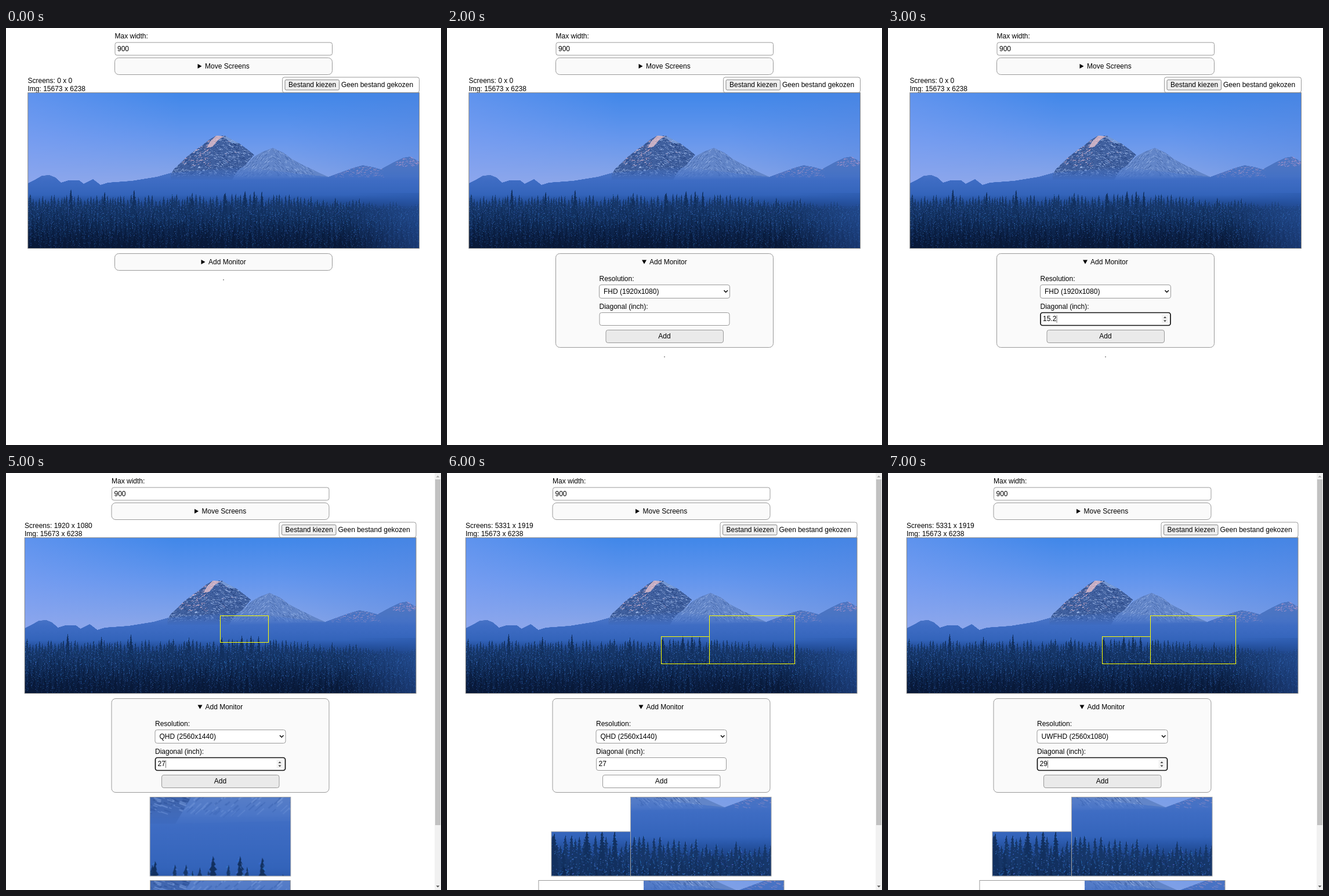
Recreate the animation shown at these times as an HTML page with a canvas. Size 750 by 720 pixels, loop 8000 ms.

```html
<!DOCTYPE html>
<html lang="nl">
<head>
<meta charset="utf-8">
<title>Monitor layout</title>
<style>
html, body { margin: 0; overflow: hidden; background: #fff; }
canvas { display: block; }
</style>
</head>
<body>
<canvas id="stage" width="750" height="720"></canvas>
<script>
const ctx = document.getElementById('stage').getContext('2d');
const IMG_W = 15673, IMG_H = 6238, VIEW = 675 / IMG_W;
const LEFT = 37.5, TOP = 112, MID = 375;
const GREY = '#999';

let seed = 7;
const rnd = (a = 0, b = 1) => a + (b - a) * (seed = seed * 16807 % 2147483647) / 2147483647;

function polygon(points) {
  const path = new Path2D();
  for (let i = 0; i < points.length; i += 2) path.lineTo(points[i], points[i + 1]);
  path.closePath();
  return path;
}

// ---- landscape, drawn once at three times the view size ----
function paintPhoto() {
  const photo = document.createElement('canvas');
  photo.width = 2025;
  photo.height = 806;
  const g = photo.getContext('2d');
  g.scale(3, 3);
  g.translate(-LEFT, -TOP);

  const fade = (x0, y0, x1, y1, ...colors) => {
    const grad = g.createLinearGradient(x0, y0, x1, y1);
    colors.forEach((c, i) => grad.addColorStop(i / (colors.length - 1), c));
    return grad;
  };
  const wash = (style, y = TOP, h = 270) => {
    g.fillStyle = style;
    g.fillRect(LEFT, y, 676, h);
  };
  const fill = (path, style) => {
    g.fillStyle = style;
    g.fill(path);
  };
  const line = (x, y, dx, dy, color, width) => {
    g.strokeStyle = color;
    g.lineWidth = width;
    g.beginPath();
    g.moveTo(x, y);
    g.lineTo(x + dx, y + dy);
    g.stroke();
  };
  const texture = (path, count, x0, y0, x1, y1, color, slope) => {
    g.save();
    g.clip(path);
    for (let i = 0; i < count; i++) {
      const x = rnd(x0, x1), y = rnd(y0, y1), len = rnd(1, 5);
      line(x, y, len * Math.sign(x - (x0 + x1) / 2), len * slope, color(x, y), rnd(.4, 1.1));
    }
    g.restore();
  };

  wash(fade(0, 112, 0, 262, '#4087e9', '#6496ed', '#8aa6e8'));
  wash(fade(38, 0, 300, 0, 'rgba(140,165,245,.4)', 'rgba(140,165,245,0)'));
  wash(fade(480, 0, 712, 0, 'rgba(70,130,225,0)', 'rgba(80,130,220,.4)'));

  const ridge = polygon([38, 268, 50, 262, 62, 255, 75, 254, 85, 258, 95, 267, 108, 263, 126, 263,
    134, 269, 150, 261, 163, 271, 176, 267, 217, 264, 260, 257, 285, 250, 400, 240, 556, 257,
    575, 250, 600, 241, 615, 237, 632, 240, 646, 244, 668, 232, 685, 224, 697, 222, 713, 231,
    713, 320, 38, 320]);
  const peak = polygon([284, 253, 290, 243, 300, 234, 312, 222, 325, 212, 338, 203, 350, 193, 362, 186,
    378, 186, 390, 193, 402, 199, 414, 208, 428, 219, 415, 234, 400, 262, 284, 262]);
  const shoulder = polygon([390, 262, 400, 245, 412, 237, 428, 222, 442, 214, 460, 207, 478, 215,
    494, 227, 515, 238, 540, 250, 558, 258]);

  fill(ridge, '#4c75c2');
  texture(ridge, 170, 38, 250, 180, 272, () => rnd() < .5 ? '#38589f88' : '#7f95d066', .8);
  texture(ridge, 260, 556, 236, 650, 258, () => rnd() < .55 ? '#efaec2aa' : '#7181c088', -.3);
  texture(ridge, 70, 675, 222, 712, 238, () => '#c99dcc88', .4);

  fill(peak, '#40609f');
  texture(peak, 1500, 284, 184, 430, 255, (x, y) => {
    const lit = x < 352 + (y - 186) * .05 ? .55 : .04;
    if (rnd() < .48) return '#203c78aa';
    return rnd() < lit && y < 238 ? '#f3bdcbb0' : '#a5bfedaa';
  }, .35);
  fill(polygon([362, 186, 376, 187, 366, 193, 356, 205, 346, 207, 352, 196]), '#f6c9d0bb');
  fill(polygon([378, 186, 390, 193, 402, 199, 390, 199, 380, 192]), '#8fb4f0aa');

  fill(shoulder, '#6285c8');
  texture(shoulder, 700, 390, 207, 530, 255, () => rnd() < .55 ? '#a0bced88' : '#36589d88', .9);

  // mist hiding the feet of the mountains
  g.save();
  g.clip(ridge);
  wash(fade(0, 236, 0, 264, 'rgba(68,114,200,0)', 'rgba(64,110,198,.92)'), 236, 90);
  wash(fade(0, 258, 0, 302, 'rgba(52,101,188,.1)', 'rgba(43,93,179,1)'), 258, 70);
  g.restore();
  wash(fade(0, 302, 0, 381, '#17386f', '#0a1c3f'), 308, 74);
  wash(fade(0, 288, 0, 312, 'rgba(30,70,145,0)', '#193c78'), 288, 24);

  const tree = (x, top, half, row) => {
    const points = [x, top];
    const end = Math.min(top + 62, 383);
    const width = y => .4 + Math.min((y - top) * .17, half);
    for (let y = top + 2; y < end; y += 3) points.push(x + width(y) * rnd(.7, 1.4), y, x + width(y) * .5, y + .8);
    for (let y = end; y > top + 2; y -= 3) points.push(x - width(y) * rnd(.7, 1.4), y, x - width(y) * .5, y - 2);
    fill(polygon(points), ['#163668', '#12305f', '#0e2852', '#0b2147', '#091c3e'][row]);
    for (let y = top + 1; y < end; y += 1.7) {
      if (rnd() < .25) continue;
      const off = rnd(-1, 1) * width(y), level = rnd(.25, .8);
      line(x + off, y, Math.sign(off) * rnd(.5, 1.7), rnd(.4, 1.3),
        `rgba(${rnd(40, 90) | 0},${rnd(105, 150) | 0},220,${level.toFixed(2)})`, rnd(.4, .9));
    }
  };
  const skyline = x => 291 + Math.max(0, x - 480) * .06 + rnd(-5, 7);
  for (let row = 0; row < 5; row++) {
    for (let x = 38; x < 715; x += rnd(3.5, 7) + row) tree(x, skyline(x) + row * 15, 2.6 + row * .5, row);
    if (row === 0) {
      [[112, 278], [170, 283], [221, 279], [321, 284], [378, 284], [412, 281], [428, 281], [441, 282]]
        .forEach(([x, y]) => tree(x, y, 3.5, 1));
    }
  }
  wash(fade(0, 330, 0, 381, 'rgba(5,15,40,0)', 'rgba(5,15,40,.3)'), 330, 52);
  wash(fade(590, 0, 712, 0, 'rgba(43,88,168,0)', 'rgba(43,88,168,.5)'), 285, 97);
  return photo;
}
const photo = paintPhoto();

// ---- form helpers ----
function text(str, x, y, align = 'left') {
  ctx.fillStyle = '#000';
  ctx.textAlign = align;
  ctx.fillText(str, x, y);
}

function box(x0, y0, x1, y1, { fill = '#fff', stroke = GREY, radius = 3.5, width = 1 } = {}) {
  ctx.beginPath();
  ctx.roundRect(x0, y0, x1 - x0, y1 - y0, radius);
  ctx.fillStyle = fill;
  ctx.fill();
  ctx.strokeStyle = stroke;
  ctx.lineWidth = width;
  ctx.stroke();
}

function shape(color, ...points) {
  ctx.fillStyle = color;
  ctx.fill(polygon(points));
}

function details(y, height, label, x, open) {
  box(187.5, y, 562.5, y + height, { fill: '#fafafa', radius: 7 });
  if (open) shape('#000', x, y + 11, x + 8, y + 11, x + 4, y + 18);
  else shape('#000', x + .5, y + 10.5, x + 7.5, y + 14.5, x + .5, y + 18.5);
  text(label, x + 13, y + 18.5);
}

function monitorForm({ resolution, diagonal, focus, hover }) {
  text('Resolution:', 262.5, 437);
  box(262.5, 443.5, 487.5, 466.5);
  text(resolution, 270, 459);
  ctx.strokeStyle = '#000';
  ctx.lineWidth = 1.5;
  ctx.beginPath();
  ctx.moveTo(477.5, 453);
  ctx.lineTo(480.7, 456.3);
  ctx.lineTo(484, 453);
  ctx.stroke();

  text('Diagonal (inch):', 262.5, 485);
  box(263, 491.5, 487, 513.5, focus ? { stroke: '#101010', width: 1.7 } : {});
  text(diagonal, 267, 506);
  if (focus) {
    ctx.fillStyle = '#555';
    ctx.fillRect(267.3 + ctx.measureText(diagonal).width, 496, .8, 13);
    ctx.fillStyle = '#f3f3f3';
    ctx.fillRect(472, 495, 11, 15);
    shape('#444', 475, 501, 480, 501, 477.5, 498);
    shape('#444', 475, 504.5, 480, 504.5, 477.5, 507.5);
  }
  box(274, 521.5, 476.5, 543.5, { fill: hover ? '#fff' : '#eaeaea' });
  text('Add', MID, 536, 'center');
}

// ---- monitors: place in image pixels, native resolution ----
const small = { x: 0, y: 0, w: 1920, h: 1080, nw: 1920, nh: 1080 };
const pair = [{ ...small, y: 839 }, { x: 1920, y: 0, w: 3411, h: 1919, nw: 2560, nh: 1440 }];

function crop(s, x, y, w, h) {
  const k = photo.width / IMG_W;
  ctx.drawImage(photo, (IMG_W / 2 + s.x) * k, (IMG_H / 2 + s.y) * k, s.w * k, s.h * k, x, y, w, h);
}

function outline(x, y, w, h, color) {
  ctx.strokeStyle = color;
  ctx.lineWidth = 1;
  ctx.strokeRect(x, y, w, h);
}

function monitors(screens, width, height) {
  for (const s of screens) {
    const x = MID + s.x * VIEW, y = 246.4 + s.y * VIEW;
    const x0 = Math.round(x), y0 = Math.floor(y) + .5;
    outline(x0, y0, Math.round(x + s.w * VIEW) - x0, Math.floor(y + s.h * VIEW) + .5 - y0, '#ff0');
  }

  const scale = 136.5 / height;
  for (const s of screens) {
    const place = [MID + (s.x - width / 2) * scale, 559.5 + s.y * scale, s.w * scale, s.h * scale];
    crop(s, ...place);
    outline(...place, '#aaa');
  }

  const strip = 136 / Math.max(...screens.map(s => s.nh));
  const total = screens.reduce((sum, s) => sum + s.nw, 0) * strip;
  let x = MID - total / 2;
  for (const s of screens) {
    crop(s, x, 839.5 - s.nh * strip, s.nw * strip, s.nh * strip);
    x += s.nw * strip;
  }
  outline(MID - total / 2, 703.5, total, 136, GREY);
}

function scrollbar() {
  ctx.fillStyle = '#f1f1f1';
  ctx.fillRect(739, 0, 11, 720);
  ctx.fillStyle = '#c1c1c1';
  ctx.fillRect(740, 11, 9, 597);
  shape('#a3a3a3', 741.5, 7.5, 747.5, 7.5, 744.5, 4.5);
  shape('#505050', 741.5, 712.5, 747.5, 712.5, 744.5, 715.5);
}

// ---- one step per second ----
const FHD = 'FHD (1920x1080)', QHD = 'QHD (2560x1440)', UWFHD = 'UWFHD (2560x1080)';
const none = { screens: [], width: 0, height: 0 };
const one = { screens: [small], width: 1920, height: 1080 };
const two = { screens: pair, width: 5331, height: 1919 };
const form = (resolution, diagonal, focus, hover) => ({ resolution, diagonal, focus, hover });
const steps = [
  { layout: none },
  { layout: none },
  { layout: none, form: form(FHD, '', false, false) },
  { layout: none, form: form(FHD, '15.2', true, false) },
  { layout: one, form: form(FHD, '15.2', false, true) },
  { layout: one, form: form(QHD, '27', true, false) },
  { layout: two, form: form(QHD, '27', false, true) },
  { layout: two, form: form(UWFHD, '29', true, false) },
];

function draw({ layout, form }) {
  const { screens, width, height } = layout;
  ctx.fillStyle = '#fff';
  ctx.fillRect(0, 0, 750, 720);
  ctx.font = '12px "Liberation Sans", Arial, sans-serif';
  ctx.save();
  if (screens.length) ctx.translate(-5.5, 0);

  text('Max width:', 187.5, 18);
  box(188, 25, 562.5, 47);
  text('900', 192, 40);
  details(51.5, 29, 'Move Screens', 330, false);
  text(`Screens: ${width} x ${height}`, LEFT, 95);
  text(`Img: ${IMG_W} x ${IMG_H}`, LEFT, 109);
  box(476.5, 85, 712.5, 111.5);
  box(481, 89.5, 574.5, 107, { fill: '#efefef', stroke: '#858585', radius: 2 });
  text('Bestand kiezen', 487, 102);
  text('Geen bestand gekozen', 578, 102);

  ctx.drawImage(photo, LEFT, TOP, 675, IMG_H * VIEW);
  outline(LEFT + .25, TOP - .3, 674.75, 268.8, '#888');

  details(389.5, form ? 162 : 29, 'Add Monitor', 336, !!form);
  if (form) monitorForm(form);
  if (screens.length) monitors(screens, width, height);
  else {
    ctx.fillStyle = '#888';
    ctx.fillRect(374, form ? 567 : 434, 2, 1.5);
  }
  ctx.restore();
  if (screens.length) scrollbar();
}

let shown = -1;
function tick() {
  const index = Math.floor(performance.now() / 1000) % steps.length;
  if (index !== shown) draw(steps[shown = index]);
  requestAnimationFrame(tick);
}
tick();
</script>
</body>
</html>
```
